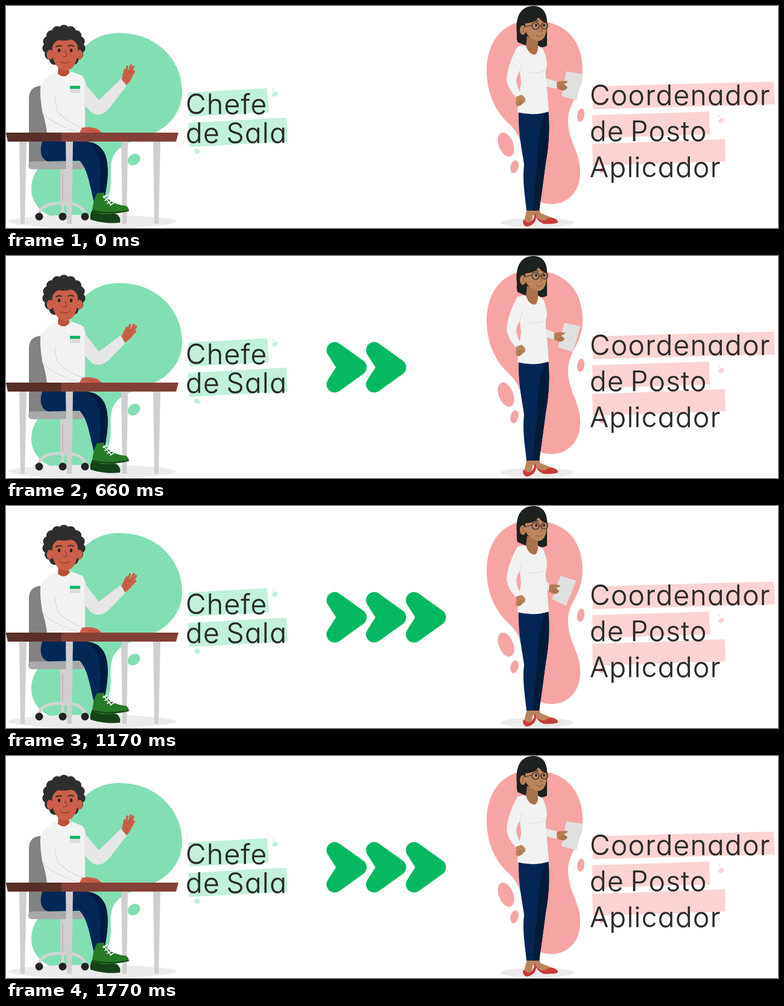
Write an HTML page that moves like this. It is 1280x370 px and loops after 1800 ms.

```html
<!DOCTYPE html>
<html lang="pt">
<head>
<meta charset="utf-8">
<style>
html, body { margin: 0; width: 100%; height: 100%; overflow: hidden; background: #fff; }
svg { display: block; width: 100%; height: 100%; }
.line { fill: none; stroke-linecap: round; stroke-linejoin: round; }
text { font: 300 46px Inter, sans-serif; font-feature-settings: "cv11"; letter-spacing: 1.4px; word-spacing: -4px;
  fill: #292929; stroke: #292929; stroke-width: .4; stroke-linejoin: round; }
</style>
</head>
<body>
<svg viewBox="0 0 1280 370">
  <defs>
    <path id="arrow" d="M545 157L584.5 185.5L545 214L563 185.5Z" fill="#04b961" stroke="#04b961" stroke-width="27" stroke-linejoin="round"/>
  </defs>

  <!-- Man at the desk -->
  <path fill="#82dfb3" d="M188 45C250 45 292 90 292 143C292 178 268 203 242 213C205 228 178 232 174 265C172 285 178 305 165 328C150 350 120 356 95 355C67 354 42 333 42 305C42 285 52 270 62 262C90 235 75 160 110 100C125 65 150 45 188 45Z"/>
  <ellipse cx="212" cy="256" rx="11" ry="9" transform="rotate(-38 212 256)" fill="#82dfb3"/>
  <ellipse cx="143" cy="359" rx="139" ry="11" fill="#ebebeb"/>

  <path fill="#828282" d="M38 262V153Q39 133 60 133H78V262Z"/>
  <path fill="#cfcfcf" d="M90 270H101V328H90Z"/>
  <path class="line" stroke="#a9a9a9" d="M94 280V325"/>
  <path class="line" stroke="#d2d2d2" stroke-width="5" d="M55 346Q58 331 84 329H104Q127 331 131 346M94 329V346"/>
  <g fill="#222"><circle cx="55" cy="351" r="6.5"/><circle cx="94" cy="351" r="6.5"/><circle cx="131" cy="351" r="6.5"/></g>
  <rect x="37" y="259" width="93" height="13" rx="6" fill="#a9a9a9"/>

  <path fill="#cfcfcf" d="M191 226H202L200 363H193Z"/>
  <path fill="#154218" d="M144 338L184 347Q191 353 189 361Q165 364 140 356Q138 348 144 338Z"/>
  <path fill="#042856" d="M60 226C55 242 58 256 70 259L122 258C136 272 139 300 146 327L163 321C170 290 172 255 160 240C152 228 140 226 125 226Z"/>
  <path fill="#021c40" d="M128 226C146 231 154 246 156 264Q158 296 153 325L163 321C170 290 172 255 160 240C152 229 142 226 128 226Z"/>
  <path fill="#267b25" d="M151 312L162 311C165 321 178 331 199 333Q205 337 203 342Q183 347 160 347L143 342Q144 325 151 312Z"/>
  <path class="line" stroke="#154218" stroke-width="2" d="M144 341Q170 348 203 341"/>
  <path class="line" stroke="#fff" stroke-width="1.7" d="M161 319L168 315M164 324L171 320M168 329L175 325M173 332L179 328M162 317L174 331"/>

  <path fill="#f2f2f2" d="M82 110Q96 121 108 109L126 116Q133 121 131 150V211H68Q65 190 60 175Q56 150 57 135Q60 122 82 110Z"/>
  <path class="line" stroke="#d9d9d9" stroke-width="1.2" d="M81 152Q83 173 88 179Q108 197 130 204M63 179Q72 194 122 211"/>
  <path fill="#cb5f48" d="M126 203Q143 200 153 206L159 211H122Z"/>
  <path class="line" stroke="#a94532" d="M134 207Q146 207 153 211"/>
  <path fill="#09b866" d="M106 133H123V138H106Z"/>
  <path fill="#dcdcdc" d="M106 138H123V145H106Z"/>

  <g fill="#2e2e2e" id="curls"></g>
  <path fill="#b94f3a" d="M87 98L86 113Q96 122 105 112L104 98Z"/>
  <g fill="#cb5f48">
    <ellipse cx="73" cy="81" rx="5.5" ry="8"/><ellipse cx="122" cy="81" rx="5" ry="8"/>
    <path d="M77 68Q80 58 88 57Q98 59 108 56Q117 58 119 68Q120 85 114 97Q108 108 98 108Q86 106 80 93Q75 83 77 68Z"/>
  </g>
  <path class="line" stroke="#2e2e2e" stroke-width="2" d="M83 68Q87 65 92 67M103 67Q108 64 112 67"/>
  <path class="line" stroke="#963b2c" stroke-width="1.3" d="M98 75L101 83Q98 86 95 84M90 93Q98 98 106 92"/>
  <g class="eyes" fill="#272322"><ellipse cx="88" cy="74" rx="2.2" ry="3"/><ellipse cx="108" cy="74" rx="2.2" ry="3"/></g>

  <path id="sleeve" fill="#e6e6e6"/>
  <g id="wave">
    <path fill="#cb5f48" d="M-4 -4L-2 -14Q4 -19 12 -14Q14 -7 9 -1L4 5Z"/>
    <path class="line" stroke="#cb5f48" stroke-width="3.8" d="M-1 -11L1 -20M3 -13L5 -26M7 -12L11 -28M9 -11L15 -26M11 -9L16 -18"/>
    <path class="line" stroke="#a94532" stroke-width=".8" d="M5 -14L7 -20M8 -13L11 -20M2 -9Q6 -6 4 -2"/>
  </g>

  <path fill="#844038" d="M0 211H286L282 226H3Z"/>
  <path fill="#582f29" d="M0 211H92V226H3Z"/>
  <path fill="#cfcfcf" d="M22 226H34L31 363H24ZM99 226H111L109 363H101ZM244 226H256L253 363H246Z"/>

  <!-- Left caption -->
  <g fill="#c1f0db">
    <path d="M302 144L433 137L436 177L304 184ZM302 195L465 186L467 226L304 235Z"/>
    <ellipse cx="446" cy="147" rx="5" ry="4" transform="rotate(-40 446 147)"/><circle cx="443" cy="140" r="1.6"/>
    <ellipse cx="317" cy="242" rx="5" ry="4" transform="rotate(40 317 242)"/>
  </g>
  <text x="298" y="180">Chefe</text>
  <text x="298" y="228">de Sala</text>

  <g id="arrows"><use href="#arrow"/><use href="#arrow" x="65.5"/><use href="#arrow" x="131.5"/></g>

  <!-- Woman with the sheet -->
  <g fill="#f7a4a4">
    <path d="M872 24C928 24 956 57 956 108C956 148 930 160 932 195C934 230 953 245 952 278C952 310 930 330 905 330C868 330 862 300 860 270C858 230 850 212 835 197C810 175 797 143 797 108C797 58 825 24 872 24Z"/>
    <ellipse cx="829" cy="231" rx="12" ry="21" transform="rotate(-22 829 231)"/>
    <ellipse cx="843" cy="268" rx="6.5" ry="11" transform="rotate(14 843 268)"/>
    <ellipse cx="953" cy="182" rx="6" ry="11" transform="rotate(8 953 182)"/>
  </g>
  <ellipse cx="881" cy="361" rx="61" ry="8" fill="#ebebeb"/>
  <path fill="#bd845c" d="M864 338H884L886 345L908 354L890 360L874 348L871 361L859 358Z"/>
  <path fill="#c83b3b" d="M858 356Q864 361 870 360Q877 354 876 345Q882 352 876 361Q868 369 861 367Q855 362 858 356ZM877 346Q882 359 894 357Q901 352 907 353Q916 356 915 361Q908 364 891 363Q880 359 877 346Z"/>
  <path fill="#032652" d="M850 175L899 173C902 200 900 235 895 260Q890 300 884 341H863C860 312 856 290 859 265C856 240 849 215 850 175Z"/>
  <path fill="#021c38" d="M899 176C902 200 900 235 895 260Q890 300 884 341H874Q876 300 881 265Q880 218 893 180Z"/>

  <path fill="#1d211f" d="M847 45C844 15 855 0 875 0C894 1 899 16 897 40V66Q891 70 885 68L875 62L862 66L848 60Q846 53 847 45Z"/>
  <path fill="#a9714c" d="M864 50L862 66Q866 82 877 81Q883 75 882 66V54Z"/>
  <path fill="#bd845c" d="M861 29Q877 28 883 19Q889 27 896 28Q898 43 892 53Q886 61 877 57Q866 52 861 42Z"/>
  <ellipse cx="857" cy="40" rx="5" ry="8" fill="#bd845c"/>
  <path class="line" stroke="#875237" d="M856 36Q860 38 857 43M887 34L889 42L885 43M879 49Q885 53 890 48"/>
  <path class="line" stroke="#242424" stroke-width="1.5" d="M873 26Q878 23 882 25M889 25Q893 24 896 26"/>
  <g class="eyes" fill="#242424"><ellipse cx="879" cy="32" rx="1.8" ry="2.6"/><ellipse cx="892" cy="32" rx="1.8" ry="2.6"/></g>
  <g class="line" stroke="#292929" stroke-width="1.2"><circle cx="878" cy="33" r="6"/><circle cx="893" cy="33" r="5.5"/><path d="M872 32L859 35M884 33H888"/></g>

  <path id="forearm" fill="#e6e6e6"/>
  <path fill="#f2f2f2" d="M848 68Q856 65 862 66Q867 82 878 81Q883 77 882 66L890 71Q897 85 897 99Q893 112 896 125L900 176Q875 184 848 177Q850 150 854 128L852 108Q846 117 846 125Q848 138 855 148L846 153Q832 138 830 123C831 105 839 83 848 68Z"/>
  <path class="line" stroke="#dadada" d="M868 111Q882 114 894 107M852 108L856 94"/>
  <path fill="#bd845c" d="M846 151L855 148Q863 154 861 159L853 166Q847 169 845 163Z"/>
  <path class="line" stroke="#875237" stroke-width=".8" d="M849 160L857 158M849 164L855 162"/>
  <g id="sheet">
    <path fill="#e0e0e0" d="M15 -23L42 -19L32 25L7 18Z"/>
    <path fill="#b47b54" d="M-1 -5Q5 -8 17 -7Q18 -4 11 -2L17 3Q16 8 9 9L0 6Z"/>
    <path class="line" stroke="#875237" stroke-width=".8" d="M8 1L14 4M6 4L11 7"/>
  </g>

  <!-- Right caption -->
  <g fill="#fbd3d3">
    <path d="M972 134L1273 126L1275 164L973 172ZM972 182L1166 176L1167 214L973 220ZM972 230L1192 222L1193 259L973 266Z"/>
    <ellipse cx="1186" cy="191" rx="5" ry="4" transform="rotate(-40 1186 191)"/><circle cx="1183" cy="183" r="1.6"/>
    <ellipse cx="988" cy="274" rx="5" ry="4" fill="#f7a4a4"/>
  </g>
  <text x="968" y="165">Coordenador</text>
  <text x="968" y="225">de Posto</text>
  <text x="968" y="285">Aplicador</text>
</svg>
<script>
const LOOP = 1800;
const $ = id => document.getElementById(id);
const eyes = document.querySelectorAll('.eyes');
const arrows = [...$('arrows').children];

function smooth(t, from, to) {
  const u = Math.min(1, Math.max(0, (t - from) / (to - from)));
  return u * u * (3 - 2 * u);
}

function buildCurls() {
  let curls = '<ellipse cx="96" cy="66" rx="29" ry="27"/>';
  for (let i = 0; i < 13; i++) {
    const a = (125 + i * 290 / 12) * Math.PI / 180;
    curls += `<circle cx="${96 + 27 * Math.cos(a)}" cy="${67 + 27 * Math.sin(a)}" r="8.8"/>`;
  }
  $('curls').innerHTML = curls;
}

function poseMan(t) {
  const k = (1 - Math.cos(2 * Math.PI * t / LOOP)) / 2;
  const x = 196 - 2 * k, y = 127 + 14 * k;
  $('sleeve').setAttribute('d', `M130 121L133 132L154 ${157 + 3 * k}L${x - 5} ${y - 6}L${x + 4} ${y + 6}L170 ${172 + 2 * k}Q155 187 141 177L130 165Z`);
  $('wave').setAttribute('transform', `translate(${x} ${y}) rotate(${18 * k})`);
}

function poseWoman(t) {
  const k = smooth(t, 540, 840) - smooth(t, 1310, 1780);
  const x = 914 - 13 * k, y = 132 + 4.5 * k;
  $('forearm').setAttribute('d', `M890 119L${x} ${y - 6}L${x - 1} ${y + 6}L890 133Z`);
  $('sheet').setAttribute('transform', `translate(${x} ${y}) rotate(${9 * k})`);
}

function draw(now) {
  const t = now % LOOP;
  poseMan(t);
  poseWoman(t);
  arrows.forEach((arrow, i) => arrow.style.display = t >= 300 * (i + 1) ? '' : 'none');
  const open = t >= 150 && t < 240 ? 0.2 : 1;
  eyes.forEach((pair, i) => {
    const y = i ? 32 : 74;
    pair.setAttribute('transform', `translate(0 ${y * (1 - open)}) scale(1 ${open})`);
  });
}

buildCurls();
const start = performance.now();
function tick() {
  draw(performance.now() - start);
  requestAnimationFrame(tick);
}
tick();
</script>
</body>
</html>
```
